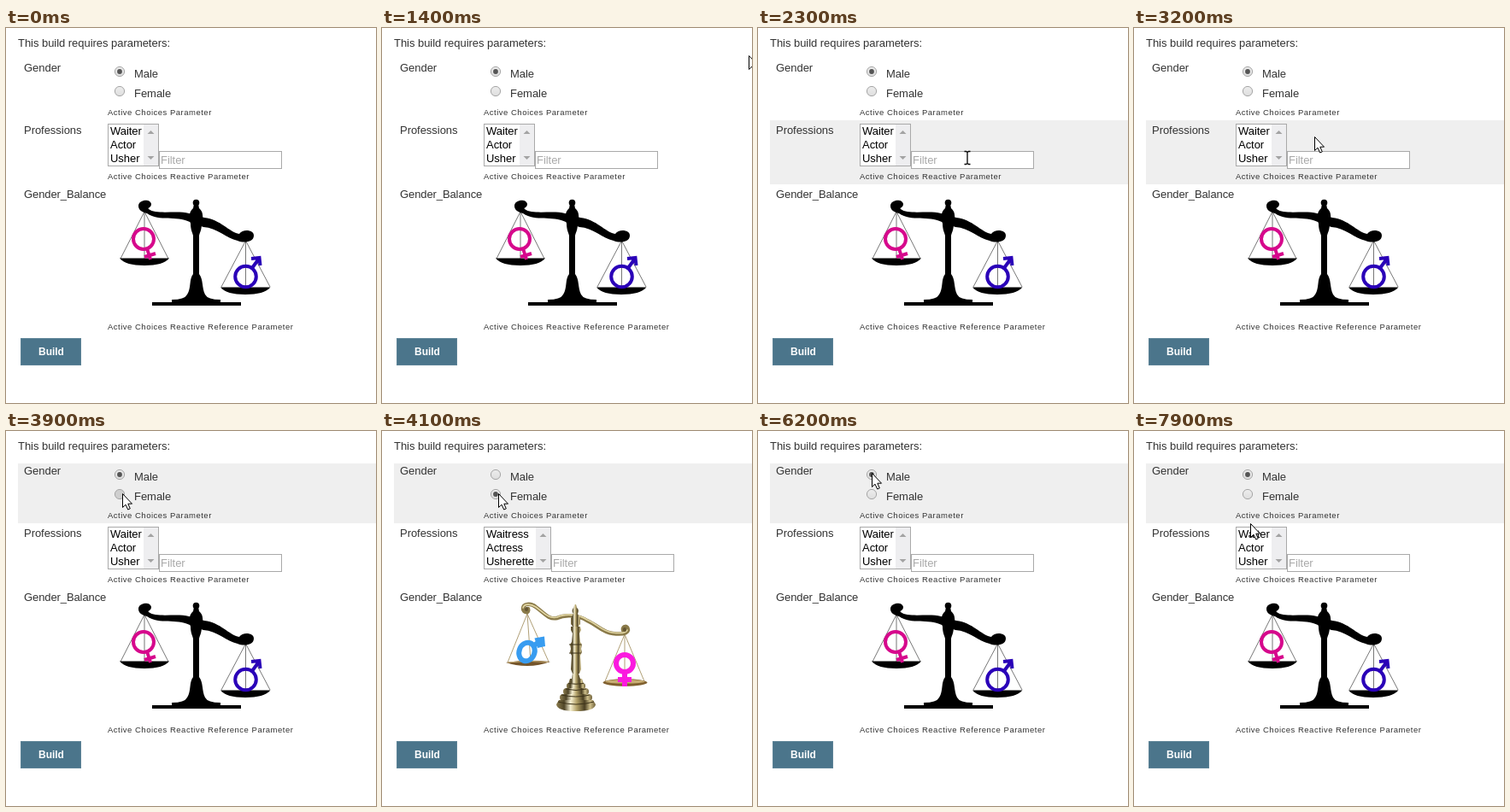
These frames come from a looping animation (433 px wide and 439 px high, 8000 ms). An HTML page:

```html
<!DOCTYPE html>
<html lang="en">
<head>
<meta charset="utf-8">
<title>Build parameters</title>
<style>
  html, body { margin: 0; width: 100%; height: 100%; overflow: hidden; background: #fff; }
  svg { display: block; width: 100%; height: 100%; }
  text { font: 13px "Liberation Sans", Arial, sans-serif; letter-spacing: -.04px; fill: #333; }
  .caption { font-size: 9.5px; letter-spacing: .5px; }
  .option { fill: #000; }
  .hint { fill: #a9a9a9; }
  .button { font-size: 12px; font-weight: bold; fill: #fff; }
  .box { fill: #fff; stroke: #a9a9a9; }
  .line { fill: none; }
</style>
</head>
<body>
<svg viewBox="0 0 433 439">
  <defs>
    <linearGradient id="idle" x2="0" y2="1">
      <stop stop-color="#ededed"/><stop offset="1" stop-color="#dedede"/>
    </linearGradient>
    <linearGradient id="brass">
      <stop stop-color="#8b7c4e"/><stop offset=".2" stop-color="#4f4527"/>
      <stop offset=".36" stop-color="#f6f0d2"/><stop offset=".52" stop-color="#b3a269"/>
      <stop offset=".72" stop-color="#4a3f22"/><stop offset=".86" stop-color="#cfc08c"/>
      <stop offset="1" stop-color="#6e5f38"/>
    </linearGradient>
  </defs>

  <rect id="highlight" x="14" width="419" fill="#efefef"/>
  <text x="14" y="22">This build requires parameters:</text>
  <text x="21" y="51">Gender</text>
  <g id="male">
    <circle cx="133" cy="51" r="5.6" stroke="#a6a6a6"/><circle class="dot" cx="133" cy="51" r="2.9" fill="#555"/>
    <text x="150" y="58">Male</text>
  </g>
  <g id="female">
    <circle cx="133" cy="74" r="5.6" stroke="#a6a6a6"/><circle class="dot" cx="133" cy="74" r="2.9" fill="#555"/>
    <text x="150" y="81">Female</text>
  </g>
  <text class="caption" x="119" y="102">Active Choices Parameter</text>

  <text x="21" y="124">Professions</text>
  <rect id="list" class="box" x="119.5" y="112.5" height="49"/>
  <text class="option" x="122" y="125"></text>
  <text class="option" x="122" y="141"></text>
  <text class="option" x="122" y="157"></text>
  <g id="listEnd">
    <rect x="161" y="113" width="17" height="48" fill="#eeeef0"/>
    <path d="M165.5 124h8l-4-4zM165.5 150h8l-4 4z" fill="#a3a3a3"/>
    <rect class="box" x="179.5" y="144.5" width="143" height="20"/>
    <text class="hint" x="181" y="159">Filter</text>
  </g>
  <text class="caption" x="119" y="177">Active Choices Reactive Parameter</text>

  <text x="21" y="199" style="letter-spacing:-.1px">Gender_Balance</text>
  <g id="blackScale">
    <path class="line" stroke="#555" stroke-width=".8" d="M134 270L162 215L190 270M162 215V270M252 303L280.500 249L309 303M280.500 249V303"/>
    <path d="M133 269.500H191Q184 278 162 278T133 269.500M251 303.500H309.500Q302 312 280 312T251 303.500"/>
    <path d="M155 208C155 201 169 199 170 206C170 211 165 210 167 212C176 219 201 213 214 217L232 222C251 224 261 239 273 241C277 235 290 236 290 243C290 251 278 252 271 249C258 246 247 234 231 233L215 227C199 219 180 227 165 217C157 215 155 212 155 208Z"/>
    <circle cx="222.500" cy="204.500" r="3.800"/>
    <path d="M220 206H225L226 211C231 215 231 222 229 229C229 236 227 239 226 243V288C231 294 229 304 233 312Q236 318 251 318V321H275V325H171V321H194V318Q209 318 212 312C217 304 214 294 219 288V243C218 239 216 236 216 229C214 222 214 215 219 211Z"/>
    <g class="line" stroke="#d6088c" stroke-width="4">
      <circle cx="161" cy="247" r="12"/><path d="M165 258L169 271M162 268L175 264"/>
    </g>
    <g class="line" stroke="#2a00b8" stroke-width="4">
      <circle cx="280.500" cy="291" r="12.300"/><path d="M288 281L296 270M287 270L296.500 269L297.500 278"/>
    </g>
  </g>

  <g id="brassScale">
    <path class="line" stroke="#b09f76" d="M147 271L170 214L195 270M170 214L174 270M261 293L284 238L307 293M284 238V293"/>
    <path fill="#75552b" d="M145 271Q170 267 197 270Q184 275 170 275T145 271"/>
    <path class="line" stroke="#c9b078" d="M147 271Q171 268 194 270.500"/>
    <ellipse cx="284.500" cy="294.500" rx="26" ry="4.200" fill="#80602f"/>
    <ellipse cx="284.500" cy="293.300" rx="23" ry="2.300" fill="#c7ad73"/>
    <g class="line" stroke-linecap="round">
      <path stroke="#8a7a49" stroke-width="4.500" d="M171 208C173 214 165 213 165 208C165 202 174 201 180 206C191 214 195 221 205 219C215 214 231 216 240 222C252 227 258 236 270 237C278 238 287 238 288 233C288 227 281 228 282 233"/>
      <path stroke="#e3d7a4" stroke-width="1.600" d="M165 207C166 202 174 202 180 206C191 214 195 220 205 218C215 213 231 215 240 221C252 226 258 235 270 236C278 237 286 237 287 233"/>
      <path stroke="#645532" stroke-width="4" d="M169 208V209M284 232V233"/>
    </g>
    <g fill="url(#brass)">
      <path d="M225.500 203h1.500l1 4c3 2 2 5 1 7l3 5v7l-3 4h-5l-3-4v-7l3-5c-2-2-2-5 0-7z"/>
      <path d="M221 229h11l1 4-2 4 1 10 2 3-1 5 1 4-2 4 1 16-2 5h-8l-2-5 1-16-2-4 1-4-1-5 2-3 1-10-2-4z"/>
      <path d="M223 284h7l2 6h-10zM220 290h14l2 6h-18z"/>
      <rect x="216" y="295" width="22" height="7" rx="3"/>
      <rect x="212" y="301" width="30" height="8" rx="4"/>
      <rect x="208" y="308" width="38" height="8" rx="4"/>
      <path d="M207 315H247L250 320Q249 328 227 328T204 320Z"/>
    </g>
    <path class="line" stroke="#3d3319" d="M218 295.500Q227 297 236 295.500M215 302Q227 305 239 302M210 309Q227 313 243 309M206 317Q227 323 248 317M219 250h14M219 260h14"/>
    <g class="line" stroke="#389cf0" stroke-width="6">
      <ellipse cx="169.500" cy="258.500" rx="9" ry="11" transform="rotate(20 169.500 258.500)"/>
      <path d="M176 252L184 247"/>
      <path fill="#389cf0" stroke="none" d="M178.500 242.500L190 240.500L191 252L182 254Z"/>
    </g>
    <g class="line" stroke="#fb1adf" stroke-width="6">
      <circle cx="284" cy="272" r="10"/><path d="M284 282V299M276 291H292"/>
    </g>
  </g>
  <text class="caption" x="119" y="353">Active Choices Reactive Reference Parameter</text>

  <rect x="17.500" y="363.500" width="70" height="31" fill="#4b758b" stroke="#5d8397"/>
  <text class="button" x="38" y="383">Build</text>

  <g id="cursor">
    <path id="arrow" d="M.500 .500V16.500L4 13.200L6.700 19L9.300 17.900L6.800 12.200H11.500Z" fill="#fff" stroke="#000"/>
    <path id="beamCursor" class="line" stroke="#000" stroke-width="1.300" d="M-3.500 -7.500H-1.500L0 -6.500L1.500 -7.500H3.500M0 -6.500V6.500M-3.500 7.500H-1.500L0 6.500L1.500 7.500H3.500"/>
  </g>
</svg>
<script>
const LOOP = 8000, STEP = 100;
// time, x, y of the pointer
const pointerKeys = [
  [1400, 429, 32], [2200, 245, 152], [2900, 245, 152], [3700, 136, 73],
  [5100, 136, 73], [5500, 133, 49], [7700, 133, 49], [7900, 136, 108]
];
const professions = {
  male: ["Waiter", "Actor", "Usher"],
  female: ["Waitress", "Actress", "Usherette"]
};
const $ = id => document.getElementById(id);
const options = document.querySelectorAll(".option");
const show = (node, visible) => node.setAttribute("display", visible ? "inline" : "none");
const between = (value, low, high) => value >= low && value < high;

function pointerAt(time) {
  const next = pointerKeys.findIndex(key => key[0] > time);
  if (next < 0) return pointerKeys.at(-1).slice(1);
  const [t0, x0, y0] = pointerKeys[next - 1], [t1, x1, y1] = pointerKeys[next];
  const u = (time - t0) / (t1 - t0), ease = u * u * (3 - 2 * u);
  return [x0 + (x1 - x0) * ease, y0 + (y1 - y0) * ease].map(Math.round);
}

function drawRadio(id, checked, pressed) {
  const group = $(id);
  group.firstElementChild.setAttribute("fill", pressed ? "#cfcfcf" : "url(#idle)");
  show(group.querySelector(".dot"), checked);
}

function drawPointer(time) {
  const visible = time >= pointerKeys[0][0];
  show($("cursor"), visible);
  show($("highlight"), false);
  if (!visible) return;
  const [x, y] = pointerAt(time);
  const overFilter = between(x, 180, 323) && between(y, 144, 165);
  $("cursor").setAttribute("transform", `translate(${x} ${y})`);
  show($("arrow"), !overFilter);
  show($("beamCursor"), overFilter);

  const row = [[38, 108], [108, 183]].find(([top, bottom]) => y >= top && y <= bottom);
  if (!row) return;
  show($("highlight"), true);
  $("highlight").setAttribute("y", row[0]);
  $("highlight").setAttribute("height", row[1] - row[0]);
}

function draw(now) {
  const time = Math.floor(now % LOOP / STEP) * STEP;
  const female = between(time, 4100, 6200);
  drawRadio("male", !female, between(time, 6000, 6200));
  drawRadio("female", female, between(time, 3900, 4100));

  const names = professions[female ? "female" : "male"];
  options.forEach((option, i) => option.textContent = names[i]);
  $("list").setAttribute("width", female ? 78 : 59);
  $("listEnd").setAttribute("transform", `translate(${female ? 19 : 0})`);
  show($("blackScale"), !female);
  show($("brassScale"), female);
  drawPointer(time);
}

const start = performance.now();
function tick() {
  draw(performance.now() - start);
  requestAnimationFrame(tick);
}
tick();
</script>
</body>
</html>
```
